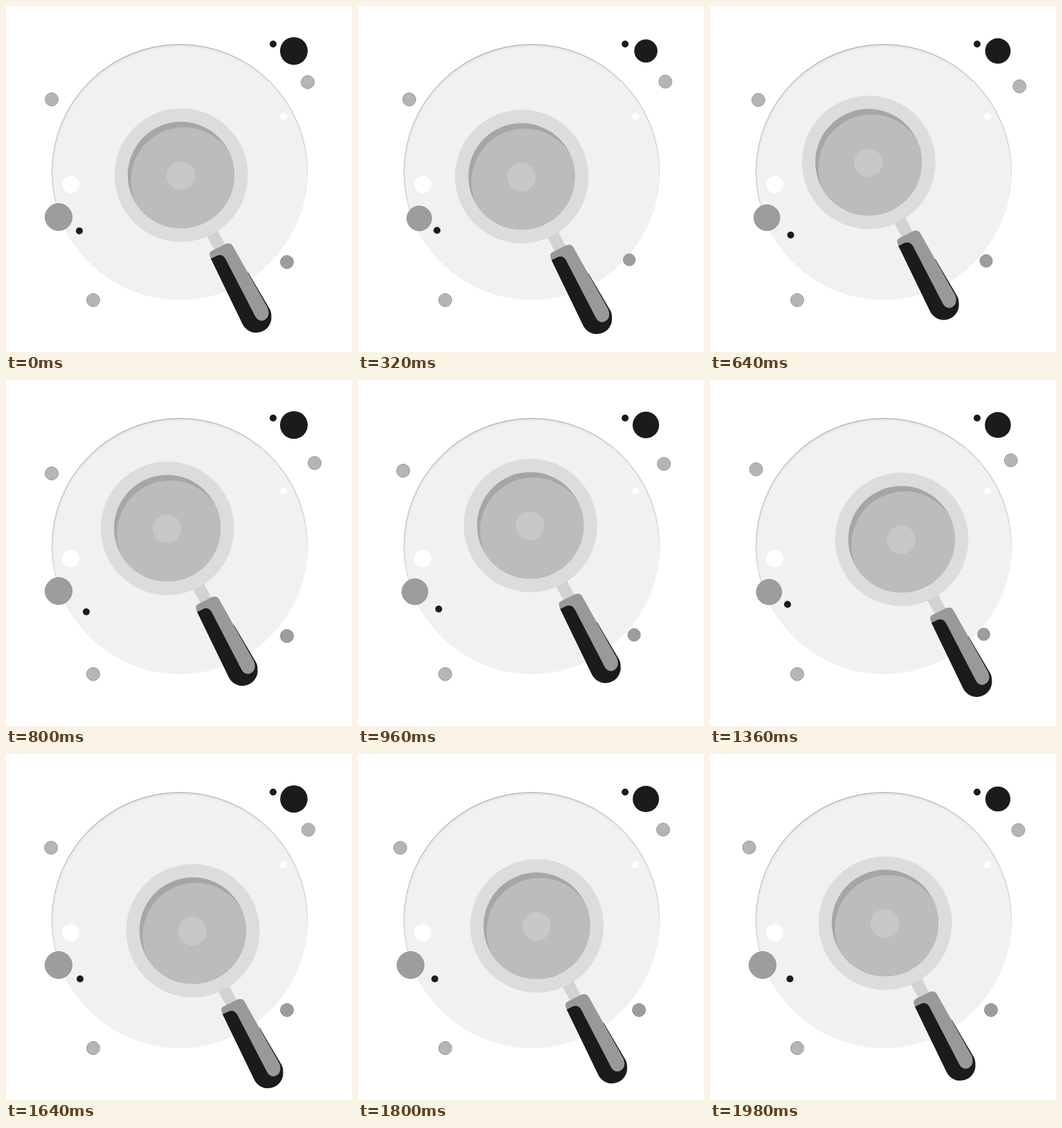
Recreate the animation shown at these times as an HTML page. Size 500 by 500 pixels, loop 2000 ms.

```html
<!DOCTYPE html>
<html lang="en">
<head>
<meta charset="utf-8">
<title>Pan on a plate</title>
<style>
  html, body { margin: 0; width: 100%; height: 100%; overflow: hidden; background: #fff; }
  svg { display: block; width: 100vw; height: 100vh; }
  .pale { fill: #b5b5b5; stroke: #9a9a9a; }
  .mid { fill: #9d9d9d; stroke: #929292; }
  .ink { fill: #1b1b1b; }
  .white { fill: #fff; }
</style>
</head>
<body>
<svg viewBox="0 0 500 500">
  <defs>
    <radialGradient id="dish" gradientUnits="userSpaceOnUse" cx="252" cy="243" r="188">
      <stop offset=".968" stop-color="#f1f1f1"/>
      <stop offset=".984" stop-color="#ebebeb"/>
      <stop offset="1" stop-color="#cfcfcf"/>
    </radialGradient>
    <linearGradient id="rim" x1=".4" y1="0" x2=".6" y2="1">
      <stop offset="0" stop-color="#999"/>
      <stop offset=".45" stop-color="#b4b4b4"/>
      <stop offset=".7" stop-color="#f1f1f1"/>
    </linearGradient>
    <clipPath id="well"><circle cx="253" cy="244.3" r="77"/></clipPath>
  </defs>

  <circle cx="251" cy="240" r="184.6" fill="url(#dish)" stroke="url(#rim)" stroke-width=".8"/>
  <circle class="white" cx="93.5" cy="258" r="12.5"/>
  <circle class="white" cx="401" cy="160" r="5"/>

  <circle class="ink" cx="386" cy="55" r="5"/>
  <circle class="ink" id="ball" cx="416" cy="65" r="20"/>
  <circle class="pale" cx="126" cy="425" r="9.5"/>
  <circle class="pale" id="left" cx="66" cy="135" r="9.5"/>
  <circle class="pale" id="right" cx="436" cy="110" r="9.5"/>
  <g id="pair">
    <circle class="mid" cx="76" cy="305" r="19.5"/>
    <circle class="mid" cx="406" cy="370" r="9.5"/>
  </g>
  <circle class="ink" id="bead" cx="106" cy="325" r="5"/>

  <g id="pan">
    <path fill="#d2d2d2" d="M290 332L306 324L317 346L302 354Z"/>
    <circle cx="253.2" cy="244.4" r="96.4" fill="#dcdcdc"/>
    <circle cx="253" cy="244.3" r="77" fill="#a6a6a6"/>
    <circle cx="257.4" cy="252.2" r="77" fill="#bcbcbc" clip-path="url(#well)"/>
    <circle cx="252.6" cy="245" r="20.6" fill="#c8c8c8"/>
    <path class="ink" d="M296 365L341.5 459A22 22 0 0 0 383.5 448Q383.5 441 380 436L350 385L318 365Q313 357 304 361Z"/>
    <path fill="#999" d="M294.5 360Q293.5 356 297 354L318 343.5Q325 341.5 328 347L378 436Q381 443 378.5 449Q374 456 367 454.5Q362.5 453 360 448L318 367Q313 357 304 361L296 365Z"/>
  </g>
</svg>
<script>
const LOOP = 2000;
const STEPS = [0, 400, 800, 1200, 1600, 2000];
const $ = id => document.getElementById(id);

// Index of the running segment and the progress within it
function locate(times, t) {
  let i = 0;
  while (i < times.length - 2 && t >= times[i + 1]) i++;
  return [i, Math.min(1, (t - times[i]) / (times[i + 1] - times[i]))];
}

// Smooth route through the points, at even speed between two keys
function route(points, times = STEPS) {
  const last = points.length - 1;
  const tangent = i => {
    const a = points[Math.max(0, i - 1)], b = points[Math.min(last, i + 1)];
    return [(b[0] - a[0]) / 6, (b[1] - a[1]) / 6];
  };
  const legs = points.slice(1).map((q, i) => {
    const p = points[i], u = tangent(i), v = tangent(i + 1);
    const path = document.createElementNS("http://www.w3.org/2000/svg", "path");
    path.setAttribute("d", `M${p}C${p[0] + u[0]},${p[1] + u[1]} ${q[0] - v[0]},${q[1] - v[1]} ${q}`);
    return { path, length: path.getTotalLength() };
  });
  return t => {
    const [i, k] = locate(times, t);
    const { x, y } = legs[i].path.getPointAtLength(legs[i].length * k);
    return `translate(${x} ${y})`;
  };
}

// Linear scaling about a fixed point
function zoom(values, cx, cy) {
  return t => {
    const [i, k] = locate(STEPS, t);
    const s = values[i] + (values[i + 1] - values[i]) * k;
    return `translate(${cx} ${cy}) scale(${s}) translate(${-cx} ${-cy})`;
  };
}

const moves = {
  pan: route([[0, 0], [-20, 0], [-20, -30], [20, -30], [20, 10], [0, 0]],
             [0, 400, 800, 1200, 1600, 1880]),
  left: route([[0, 0], [10, 0], [0, 0], [0, -10], [0, 0], [-10, 0]]),
  right: route([[0, 0], [10, 0], [10, 10], [0, 10], [0, 0], [10, 0]]),
  bead: route([[0, 0], [10, 0], [10, 10], [10, 0], [0, 0], [10, 0]]),
  ball: zoom([1, .8, 1, .9, 1, .9], 416, 65),
  pair: zoom([1, .9, 1, .9, 1, 1], 232, 329)
};

function draw() {
  const t = performance.now() % LOOP;
  for (const id in moves) $(id).setAttribute("transform", moves[id](t));
  requestAnimationFrame(draw);
}
draw();
</script>
</body>
</html>
```
